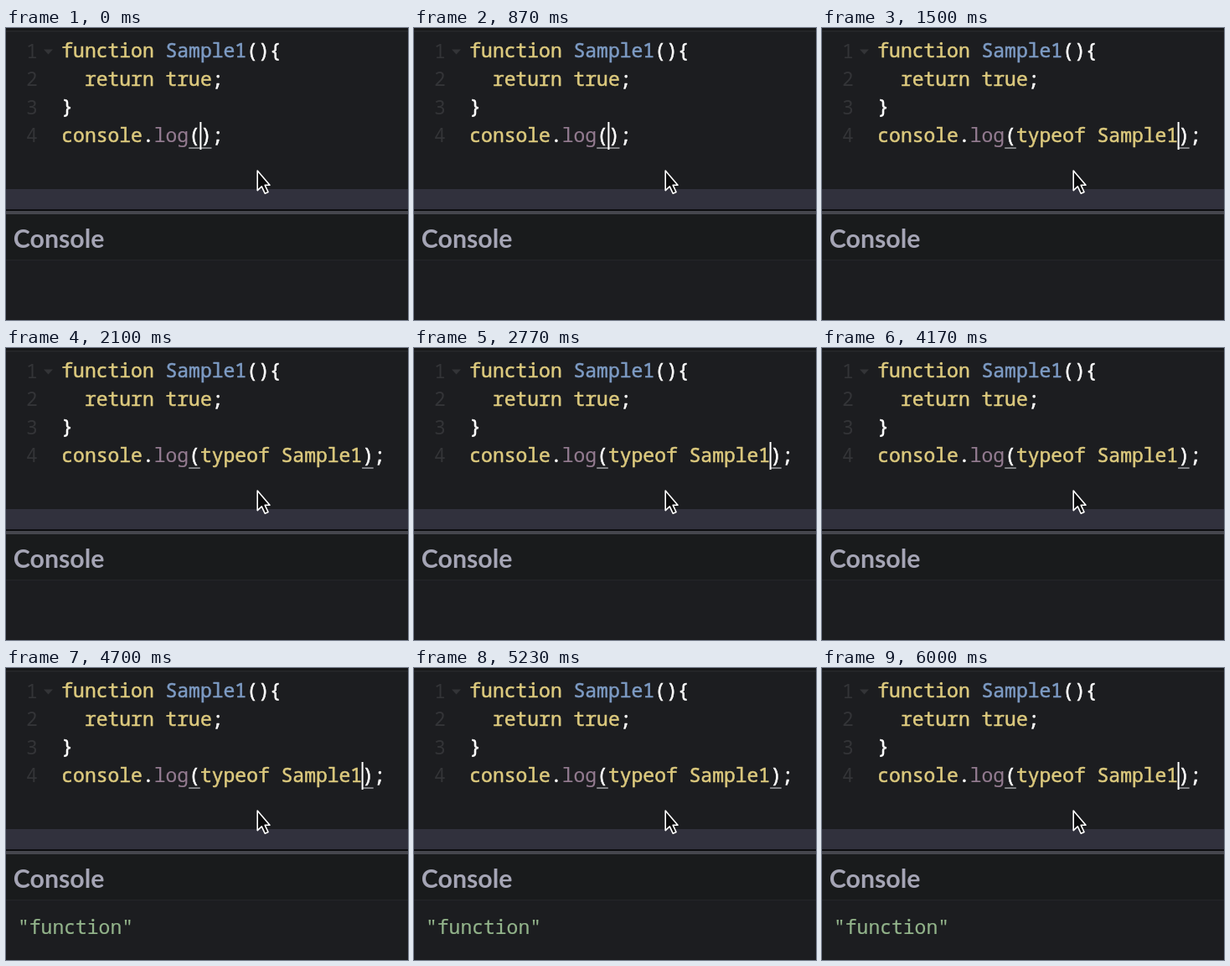
Animation of 480x348 px, one loop 6.03 s. Source, as an HTML page:

```html
<!DOCTYPE html>
<html lang="en">
<head>
<meta charset="utf-8">
<title>Function type in the console</title>
<style>
  html, body { margin: 0; width: 100%; height: 100%; overflow: hidden; background: #1c1d20; }
  svg { display: block; width: 100vw; height: 100vh; }
  text { white-space: pre; }
  .code { font: 23px "Noto Sans Mono", "DejaVu Sans Mono", monospace; color: #fff; }
  .code, .code tspan { fill: currentColor; stroke: currentColor; stroke-width: 0.55; }
  .key { color: #ddca7e; }
  .def { color: #7d9bc4; }
  .code .prop { color: #937b90; stroke-width: 0.2; }
  .num { fill: #333437; stroke: none; }
  .code.out { color: #93b48b; stroke-width: 0.2; }
  .title { font: 700 30.3px Lato, "Open Sans", sans-serif; fill: #a5a5b5; }
  .match { fill: #a0a0a4; }
</style>
</head>
<body>
<svg viewBox="0 0 480 348">
  <rect width="480" height="348" fill="#1c1d20"/>
  <rect width="480" height="3" fill="#18191b"/>
  <rect y="3" width="480" height="1.5" fill="#27282b"/>

  <g class="code">
    <g class="num">
      <text x="24" y="35.5">1</text>
      <text x="24" y="69">2</text>
      <text x="24" y="102.5">3</text>
      <text x="24" y="136.3">4</text>
      <path d="M45 25.5H56L50.5 31.5Z"/>
    </g>
    <text x="66.3" y="35.3"><tspan class="key">function</tspan> <tspan class="def">Sample1</tspan>(){</text>
    <text x="66.3" y="68.8">  <tspan class="key">return true</tspan>;</text>
    <text x="66.3" y="102.4">}</text>
    <text x="66.3" y="136.2"><tspan class="key">console</tspan>.<tspan class="prop">log</tspan>(<tspan class="key" id="arg"></tspan>);</text>
  </g>
  <g class="match">
    <rect x="218.2" y="142.3" width="13.6" height="1.5"/>
    <rect id="close" y="142.3" width="13.6" height="1.5"/>
  </g>
  <rect id="caret" y="112" width="2" height="33" fill="#fff"/>

  <rect y="192" width="480" height="24" fill="#31313d"/>
  <rect y="216" width="480" height="2" fill="#0d0e10"/>
  <rect y="218" width="480" height="4" fill="#45464d"/>
  <rect y="222" width="480" height="54" fill="#191b1c"/>
  <rect y="276" width="480" height="1.2" fill="#242528"/>
  <text class="title" x="8.8" y="262">Console</text>
  <text class="code out" id="out" x="14" y="316.7">"function"</text>

  <path d="M300.2 170V193.6L305.3 188.8L309.2 197.2L313 195.5L309.2 187.3H315Z"
        fill="#0b0b0c" stroke="#fff" stroke-width="1.6" stroke-linejoin="round"/>
</svg>
<script>
  const LOOP = 6030, PASTE = 1375, PRINT = 4280;
  const BLINK = 530, FIRST_ON = 700;
  const LEFT = 66.3, CHAR = 13.8, ARG_COL = 12;
  const ARG = "typeof Sample1";
  const [arg, closing, caret, out] =
    ["arg", "close", "caret", "out"].map(id => document.getElementById(id));
  const start = performance.now();

  const show = (el, on) => el.setAttribute("visibility", on ? "visible" : "hidden");

  function draw(t) {
    const pasted = t >= PASTE;
    const text = pasted ? ARG : "";
    const x = LEFT + (ARG_COL + text.length) * CHAR;
    // The blink restarts when the argument is pasted.
    const phase = t - (pasted ? PASTE : FIRST_ON - 2 * BLINK);
    if (arg.textContent !== text) arg.textContent = text;
    closing.setAttribute("x", x);
    caret.setAttribute("x", x - 0.5);
    show(caret, phase % (2 * BLINK) < BLINK);
    show(out, t >= PRINT);
  }

  function tick() {
    draw((performance.now() - start) % LOOP);
    requestAnimationFrame(tick);
  }
  tick();
</script>
</body>
</html>
```
